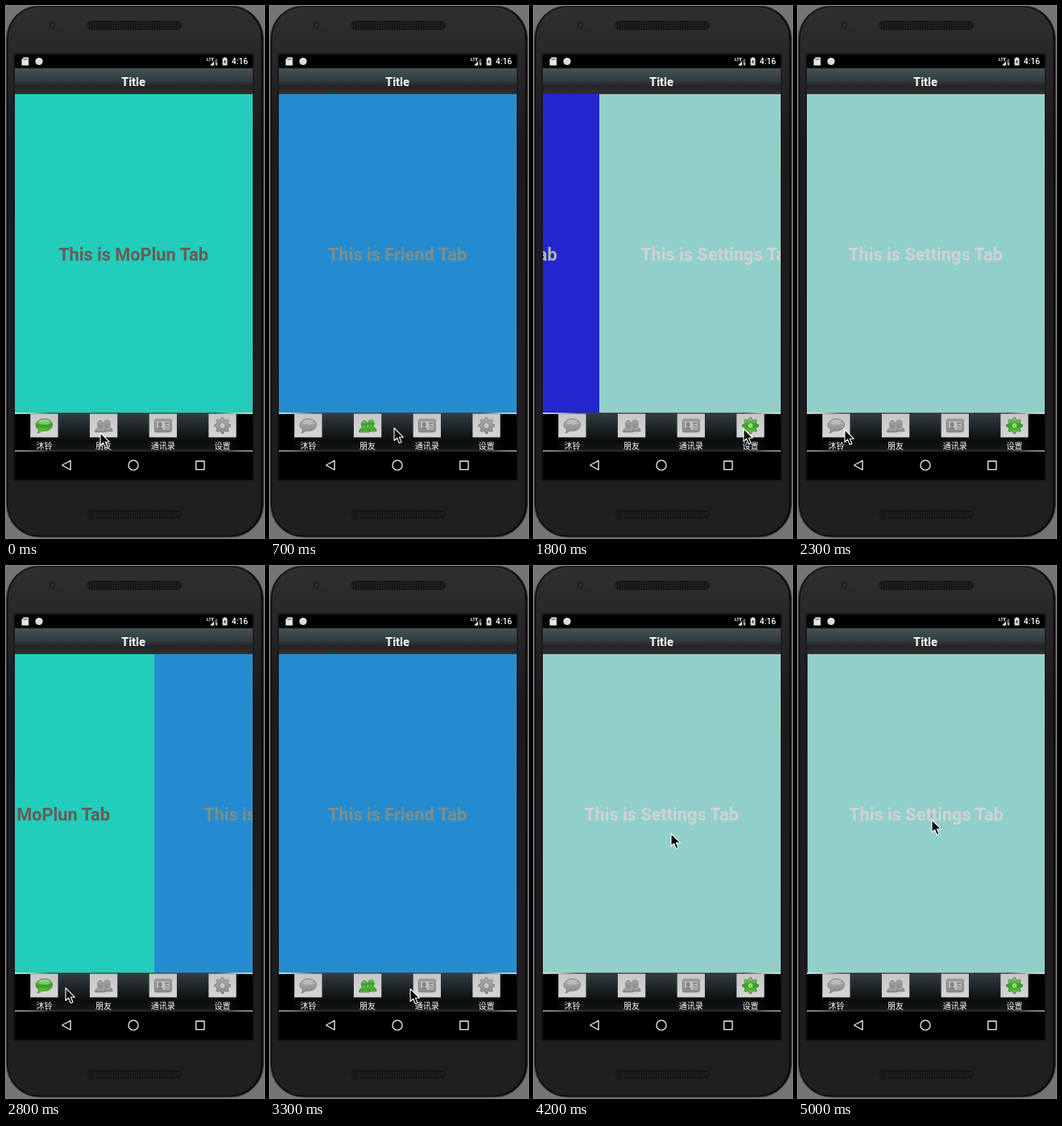
Write an HTML page that moves like this. It is 320 px wide and 658 px high and loops after 5100 ms.

```html
<!DOCTYPE html>
<html lang="en">
<head>
<meta charset="utf-8">
<title>Tab pager</title>
<style>
html, body { margin: 0; width: 100%; height: 100%; overflow: hidden; background: #747474; }
svg { display: block; width: 320px; height: 658px; }
text { text-anchor: middle; font-family: Roboto, sans-serif; }
.page text { font-size: 21.7px; font-weight: 700; }
.label { font: 500 10px "Noto Sans CJK SC", "Noto Sans CJK", "Noto Sans", sans-serif; fill: #fff; }
.icon { fill: url(#gray); stroke: #777; stroke-width: .8; }
.icon .mark { fill: #c4c4c4; }
.icon .ink { fill: #858585; }
.icon.on { fill: url(#green); stroke: #37752c; }
.icon.on .mark { fill: #8ed674; }
.icon.on .ink { fill: #2a7a22; }
</style>
</head>
<body>
<svg viewBox="0 0 320 658" xmlns="http://www.w3.org/2000/svg">
  <defs>
    <linearGradient id="shell" x2="0" y2="1">
      <stop stop-color="#302e30"/><stop offset=".25" stop-color="#1c1a1c"/><stop offset="1" stop-color="#201e20"/>
    </linearGradient>
    <linearGradient id="bar" x2="0" y2="1">
      <stop stop-color="#435156"/><stop offset=".45" stop-color="#333c3f"/>
      <stop offset=".7" stop-color="#222527"/><stop offset="1" stop-color="#332e2d"/>
    </linearGradient>
    <linearGradient id="tabs" x2="0" y2="1">
      <stop stop-color="#333d41"/><stop offset=".75" stop-color="#0a0c0d"/><stop offset="1" stop-color="#191b1c"/>
    </linearGradient>
    <linearGradient id="sides">
      <stop offset=".05"/><stop offset=".13" stop-opacity="0"/>
      <stop offset=".87" stop-opacity="0"/><stop offset=".95"/>
    </linearGradient>
    <linearGradient id="glow">
      <stop stop-color="#fff"/><stop offset=".06" stop-color="#ddd"/><stop offset=".15" stop-color="#3a3f41"/>
      <stop offset=".85" stop-color="#3a3f41"/><stop offset=".94" stop-color="#ddd"/><stop offset="1" stop-color="#fff"/>
    </linearGradient>
    <linearGradient id="tile" x2="0" y2="1"><stop stop-color="#c6c6c6"/><stop offset="1" stop-color="#d6d6d6"/></linearGradient>
    <linearGradient id="gray" x2="0" y2="1"><stop stop-color="#aeaeae"/><stop offset="1" stop-color="#8b8b8b"/></linearGradient>
    <linearGradient id="green" x2="0" y2="1">
      <stop stop-color="#8fd878"/><stop offset=".5" stop-color="#339e1e"/><stop offset="1" stop-color="#6bd63a"/>
    </linearGradient>
    <pattern id="mesh" width="3" height="3" patternUnits="userSpaceOnUse">
      <path d="M0 0H3V3H0Z" fill="#222022"/><circle cx="1.5" cy="1.5" r="1" fill="#0b0a0b"/>
    </pattern>
    <clipPath id="view"><path d="M11 109H306V503.500H11Z"/></clipPath>
  </defs>

  <rect width="320" height="658" fill="#747474"/>
  <rect x=".5" y="-.5" width="319" height="657.500" rx="41" fill="#0c0b0c" stroke="#474547"/>
  <rect x="2.500" y="1" width="314" height="654" rx="39" fill="url(#shell)"/>
  <rect x="10" y="59" width="297" height="528" fill="none" stroke="#121112"/>
  <g fill="url(#mesh)" stroke="#141314">
    <rect x="100.500" y="19" width="117" height="10" rx="5"/>
    <rect x="100.500" y="624" width="117" height="9.500" rx="4.700"/>
  </g>
  <circle cx="57.500" cy="24" r="4.500" fill="#1c1b1d" stroke="#343235"/>
  <circle cx="57.500" cy="24" r="1.800" fill="#38374a"/>

  <path d="M11 60H306V586H11Z"/>
  <path d="M22 63.500H28V73.500H19.500V66Z" fill="#e6e6e6"/>
  <path d="M22.500 65V67M24.300 65V67M26.100 65V67" stroke="#333" stroke-width=".8"/>
  <circle cx="41" cy="68.500" r="4.600" fill="#ddd"/>
  <text x="253.300" y="68" font-size="5.500" font-weight="700" fill="#eee">LTE</text>
  <path d="M253 73.500L258 68.500V73.500Z" fill="#eee"/>
  <path d="M259 73.500V67.500L262 64.500V73.500Z" fill="#666"/>
  <path d="M261.500 70V73.500" stroke="#eee"/>
  <path d="M270 63.500H273V64.500H274.500V73.500H268.500V64.500H270Z" fill="#ddd"/>
  <path d="M272 66L270 69.500H271.500L271 72L273 68.500H271.600Z" fill="#111"/>
  <text x="290" y="72.300" font-size="10.300" font-weight="500" fill="#fff">4:16</text>

  <path d="M11 77H306V109H11Z" fill="url(#bar)"/>
  <text x="158" y="98.500" font-size="14.800" font-weight="700" fill="#fff">Title</text>

  <g clip-path="url(#view)"><g id="pages"></g></g>

  <path d="M11 503H306V551H11Z" fill="url(#tabs)"/>
  <path d="M11 503H306V551H11Z" fill="url(#sides)"/>
  <path d="M11 503H306V504.500H11ZM11 549.800H306V550.700H11Z" fill="url(#glow)"/>
  <g id="items"></g>

  <g fill="none" stroke="#f2f2f2" stroke-width="1.300" stroke-linejoin="round">
    <path d="M69.500 568L80 562.300V573.700Z"/>
    <circle cx="158" cy="568" r="6.100"/>
    <path d="M235.700 563H246V573.300H235.700Z"/>
  </g>
  <path id="cursor" d="M0 0V15.500L3.600 12.200L6.300 18.500L9 17.400L6.300 11.200H11.200Z" stroke="#fff" stroke-width="1.100" stroke-linejoin="round"/>
</svg>
<script>
const LOOP = 5100, STEP = 100, WIDTH = 295, SWIPE = 4200;
const $ = id => document.getElementById(id);

function gear(teeth, outer, inner) {
  const corners = Array.from({ length: teeth * 4 }, (_, i) => {
    const r = i % 4 < 2 ? outer : inner;
    const a = (i - .5) / (teeth * 2) * Math.PI;
    return `${(r * Math.cos(a)).toFixed(2)} ${(r * Math.sin(a)).toFixed(2)}`;
  });
  return `M${corners.join("L")}Z`;
}

const person = (x, y) =>
  `<g transform="translate(${x} ${y})"><path d="M-6.500 8C-6.500 4 -4 3 -1.800 2.300H1.800C4 3 6.500 4 6.500 8Z"/>
   <ellipse cy="-1.500" rx="3.700" ry="4.800"/></g>`;

// Icons are drawn around their own centre.
const bubble = `<path d="M-7 4.500C-14 0 -9 -8.500 0 -8.500C6 -8.500 10 -5 10 -1S6 6.500 0 6.500L-3 6.200C-4.500 8 -6.500 9 -8.500 9C-7.300 7.800 -6.800 6.500 -7 4.500Z"/>
  <ellipse cy="-4" rx="7" ry="3" fill="#fff" fill-opacity=".25" stroke="none"/>`;
const card = `<rect x="-10.500" y="-8" width="21" height="16" rx="2"/>
  <rect class="mark" x="-8.500" y="-5.800" width="17" height="11.600" rx="1"/>
  <path class="ink" stroke="none" d="M-7.500 5C-7.500 1.500 -5 1.500 -4 1C-2 1.500 0 2 0 5ZM2 -4H7V-2H2ZM2 -.700H7V1H2ZM2 2.500H7V4H2Z"/>
  <circle class="ink" stroke="none" cx="-3.700" cy="-1.500" r="2.700"/>`;
const cog = `<path d="${gear(8, 10, 7.4)}"/><circle class="mark" r="3.800"/>`;

// Each tab: label, icon, page name, page colour, text colour
const tabs = [
  ["沐铃", bubble, "MoPlun", "#22cdbb", "#675c57"],
  ["朋友", person(4.3, -1) + person(-4, 0), "Friend", "#238cd0", "#7d8f88"],
  ["通讯录", card, "Address", "#2427cd", "#b3b7a9"],
  ["设置", cog, "Settings", "#91d0c9", "#d1d2d5"]
];

$("pages").innerHTML = tabs.map(([, , name, back, ink], i) =>
  `<g class="page" transform="translate(${i * WIDTH})">
    <rect x="11" y="109" width="${WIDTH}" height="395" fill="${back}"/>
    <text x="158" y="315" fill="${ink}">This is ${name} Tab</text></g>`).join("");

$("items").innerHTML = tabs.map(([label, icon], i) =>
  `<g transform="translate(${47.4 + i * 73.7} 519)">
    <rect x="-17.200" y="-14.700" width="34.300" height="29.200" fill="url(#tile)"/>
    <g class="icon">${icon}</g>
    <text class="label" y="29.300">${label}</text></g>`).join("");
const icons = document.querySelectorAll(".icon");

// Time each page is chosen; the pages go round in order, then one swipe back and forth.
const chosen = [[350, 1], [1097, 2], [1750, 3], [2669, 0], [3030, 1], [3508, 2], [3760, 3], [4350, 2], [4860, 3]];

// Pointer stops before the swipe: time, x, y
const stops = [
  [0, 117, 528], [400, 117, 526], [1050, 200, 518], [1200, 257, 518], [1800, 260, 523],
  [2300, 58, 524], [2650, 52, 522], [3050, 123, 522], [3450, 198, 523],
  [3600, 260, 525], [3800, 262, 522], [SWIPE, 170, 331]
];

const settle = u => 1 - Math.pow(1 - Math.min(u, 1), 5);
const smooth = u => u * u * (3 - 2 * u);

function pagerAt(t) {
  let pos = 0, tab = 0;
  for (const [start, to] of chosen) {
    if (t < start) break;
    const time = (Math.abs(to - tab) + 1) * 100;
    pos = tab + (to - tab) * settle((t - start) / time);
    tab = to;
  }
  return { pos, tab };
}

function pointerAt(t) {
  if (t >= SWIPE) {
    const u = (t - SWIPE) / 800;
    return [170 - 4 * u + 141 * Math.sin(Math.PI * u), 331 - 17 * u];
  }
  const i = stops.findIndex(s => s[0] > t);
  const [t0, x0, y0] = stops[i - 1], [t1, x1, y1] = stops[i];
  const u = smooth((t - t0) / (t1 - t0));
  return [x0 + (x1 - x0) * u, y0 + (y1 - y0) * u];
}

function draw(now) {
  const t = Math.floor(now % LOOP / STEP) * STEP;
  const { pos, tab } = pagerAt(t);
  const [x, y] = pointerAt(t).map(Math.round);
  $("pages").setAttribute("transform", `translate(${-Math.round(pos * WIDTH)})`);
  $("cursor").setAttribute("transform", `translate(${x} ${y})`);
  icons.forEach((icon, i) => icon.classList.toggle("on", i === tab));
}

const begin = performance.now();
function tick() {
  draw(performance.now() - begin);
  requestAnimationFrame(tick);
}
tick();
</script>
</body>
</html>
```
